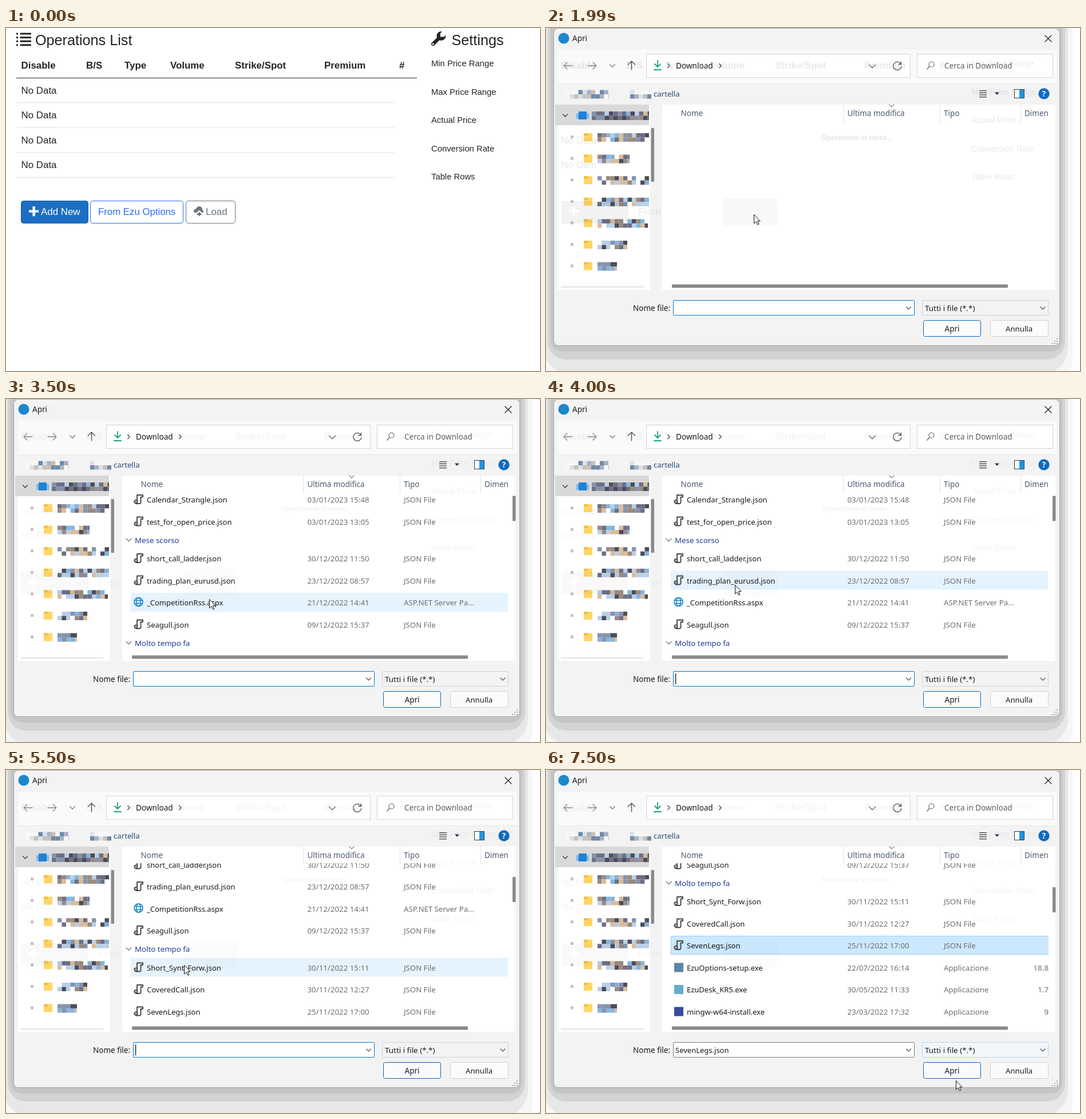
These frames come from a looping animation (933x600 px, 8 s). An HTML page:

```html
<!DOCTYPE html>
<html lang="it">
<head>
<meta charset="utf-8">
<style>
  html, body { margin: 0; width: 100%; height: 100%; overflow: hidden; background: #fff; }
  svg { display: block; width: 933px; height: 600px; }
  text { white-space: pre; }
  .page { font-family: "Liberation Sans", Arial, sans-serif; }
  .dlg { font-family: "Noto Sans", "Open Sans", sans-serif; }
</style>
</head>
<body>
<svg id="stage" viewBox="0 0 933 600"></svg>
<script>
const stage = document.getElementById('stage');

// Markup helpers
const rect = (x, y, w, h, fill, more = '') =>
  `<rect x="${x}" y="${y}" width="${w}" height="${h}" fill="${fill}" ${more}/>`;
const box = (x, y, w, h, fill, stroke, r = 0) =>
  rect(x + .5, y + .5, w - 1, h - 1, fill, `stroke="${stroke}" rx="${r}"`);
const text = (x, y, s, size, fill = '#1a1a1a', more = '') =>
  `<text x="${x}" y="${y}" font-size="${size}" fill="${fill}" ${more}>${s}</text>`;
const line = (d, stroke, w = 1.2) =>
  `<path d="${d}" fill="none" stroke="${stroke}" stroke-width="${w}" stroke-linecap="round" stroke-linejoin="round"/>`;
const disc = (x, y, r, fill) => `<circle cx="${x}" cy="${y}" r="${r}" fill="${fill}"/>`;
const shape = (d, x, y, k, fill) =>
  `<path d="${d}" fill="${fill}" transform="translate(${x} ${y}) scale(${k})"/>`;
const down = (x, y, r, c) => line(`M${x - r} ${y - r / 2}l${r} ${r}l${r} ${-r}`, c);
const right = (x, y, r, c) => line(`M${x - r / 2} ${y - r}l${r} ${r}l${-r} ${r}`, c);

function random(seed) {
  return () => (seed = seed * 16807 % 2147483647) / 2147483647;
}

// Web page
const INK = '#212529';
const WRENCH = 'M5.5 0c-1.38 0-2.5 1.12-2.5 2.5 0 .32.08.62.19.91l-2.91 2.88c-.39.39-.39 1.05 0 1.44.2.2.46.28.72.28.26 0 .52-.09.72-.28l2.88-2.91c.28.11.58.19.91.19 1.38 0 2.5-1.12 2.5-2.5 0-.16 0-.32-.03-.47l-.97.97h-2v-2l.97-.97c-.15-.03-.31-.03-.47-.03zm-4.5 6.5c.28 0 .5.22.5.5s-.22.5-.5.5-.5-.22-.5-.5.22-.5.5-.5z';
const CLOUD = 'M4.5 0c-1.21 0-2.27.86-2.5 2-1.1 0-2 .9-2 2 0 .37.11.71.28 1h2.22l2-2 2 2h1.41c.06-.16.09-.32.09-.5 0-.65-.42-1.29-1-1.5v-.5c0-1.38-1.12-2.5-2.5-2.5zm0 4.5l-2.5 2.5h2v.5c0 .28.22.5.5.5s.5-.22.5-.5v-.5h2l-2.5-2.5z';
const PLUS = 'M3 0v3h-3v2h3v3h2v-3h3v-2h-3v-3z';
const heads = [[26.5, 'Disable'], [140, 'B/S'], [207, 'Type'], [287, 'Volume'],
  [400, 'Strike/Spot'], [556, 'Premium'], [687, '#']]
  .map(([x, s]) => text(x, 71, s, 16.9, INK, 'font-weight="bold"')).join('');
const labels = ['Min Price Range', 'Max Price Range', 'Actual Price', 'Conversion Rate', 'Table Rows']
  .map((s, i) => text(743, 67 + i * 49.5, s, 14.8, INK)).join('');
const noData = i => text(26.5, 114.5 + i * 43.5, 'No Data', 16.9, INK);

function page(hover, focus) {
  let s = '';
  for (let i = 0; i < 4; i++) {
    const y = 8.5 + i * 6.6;
    s += rect(18, y, 3, 3, INK) + rect(24.5, y, 19.5, 3, INK);
    s += noData(i) + rect(18, 130.3 + i * 43.6, 661, 1, '#dee2e6');
  }
  s += text(51, 30, 'Operations List', 25.2, INK) + text(778.5, 30, 'Settings', 25.2, INK);
  s += shape(WRENCH, 743, 6, 3.15, INK) + heads + labels + rect(18, 87, 700, 1, INK);
  s += box(26, 302, 118, 40, '#1b6ec2', '#1861ac', 4) + shape(PLUS, 40, 312, 2.15, '#fff');
  s += text(61, 327, 'Add New', 16.9, '#fff');
  s += box(147, 302, 163, 40, '#fff', '#2a6df5', 4) + text(161, 327, 'From Ezu Options', 16.8, '#2a6df5');
  const tint = hover ? '#fff' : '#6c757d';
  if (focus) s += rect(310.5, 298.5, 94, 47, '#c1c5c8', 'rx="7"');
  s += box(314, 302, 87, 40, hover ? '#6c757d' : '#fff', '#6c757d', 4);
  s += shape(CLOUD, 328, 312, 2.15, tint) + text(349, 327, 'Load', 16.9, tint);
  return `<g class="page">${s}</g>`;
}

// File list: plain strings are group headings
const JS = 'JSON File', APP = 'Applicazione';
const files = [
  'All\'inizio della settimana',
  ['OperationsList.json', '10/01/2023 10:57', JS],
  'Settimana scorsa',
  ['Calendar_Strangle.json', '03/01/2023 15:48', JS],
  ['test_for_open_price.json', '03/01/2023 13:05', JS],
  'Mese scorso',
  ['short_call_ladder.json', '30/12/2022 11:50', JS],
  ['trading_plan_eurusd.json', '23/12/2022 08:57', JS],
  ['_CompetitionRss.aspx', '21/12/2022 14:41', 'ASP.NET Server Pa...'],
  ['Seagull.json', '09/12/2022 15:37', JS],
  'Molto tempo fa',
  ['Short_Synt_Forw.json', '30/11/2022 15:11', JS],
  ['CoveredCall.json', '30/11/2022 12:27', JS],
  ['SevenLegs.json', '25/11/2022 17:00', JS],
  ['EzuOptions-setup.exe', '22/07/2022 16:14', APP, '18.8', '#5b86a8'],
  ['EzuDesk_KR5.exe', '30/05/2022 11:33', APP, '1.7', '#62aecb'],
  ['mingw-w64-install.exe', '23/03/2022 17:32', APP, '9', '#3a4a9a']
];
const isGroup = f => typeof f === 'string';
const mids = [184];
for (let i = 1; i < files.length; i++)
  mids[i] = mids[i - 1] + (isGroup(files[i]) ? 32 : isGroup(files[i - 1]) ? 32.5 : 38.5);

function icon(f, y) {
  if (f[4]) return rect(224, y - 8, 16, 16, f[4]);
  if (f[0].endsWith('aspx'))
    return `<g fill="none" stroke="#1583c7" stroke-width="1.5"><circle cx="231.5" cy="${y - 1}" r="7.6"/>` +
      `<ellipse cx="231.5" cy="${y - 1}" rx="3.6" ry="7.6"/><path d="M224.500 ${y - 3.5}h14M224.500 ${y + 1.5}h14"/></g>`;
  return line(`M229 ${y + 2}v-10h10v3.500h-3.500v9q0 2.500-2.500 2.500h-6`, '#454545', 1.9) +
    `<circle cx="227" cy="${y + 3.5}" r="2.800" fill="#aaa" stroke="#454545" stroke-width="1.5"/>`;
}

function list({ x, y, scroll, chosen }) {
  let s = '';
  files.forEach((f, i) => {
    const m = mids[i] - scroll;
    if (m < 140 || m > 460) return;
    const group = isGroup(f), left = group ? 201 : 218;
    if (chosen && f[0] === 'SevenLegs.json') s += box(218, m - 17, 664, 33, '#cce8ff', '#99d1ff');
    else if (Math.abs(y - m) < 16.5) s += rect(left, m - 17, 877 - left, 33, '#e5f3ff');
    if (group) {
      s += down(214.5, m, 4.5, '#777') + text(225, m + 5, f, 13.3, '#1e3a93');
      return;
    }
    s += icon(f, m) + text(246, m + 5, f[0], 13);
    s += text(526.5, m + 5, f[1], 13.3, '#6d6d6d') + text(695, m + 5, f[2], 13.2, '#6d6d6d');
    if (f[3]) s += text(878, m + 5, f[3], 13.3, '#6d6d6d', 'text-anchor="end"');
  });
  return `<g clip-path="url(#rows)">${s}</g>`;
}

// Blurred-out names
const rnd = random(77);
const dark = ['#fff', '#4c4c58', '#8792ad', '#b9cfe8', '#d8bd9c', '#6d6f86', '#9a8a80', '#86b4de'];
const pale = ['#f7f7f7', '#d5e2ee', '#a8b2c4', '#6e8aa8', '#c9bfb5'];
function mosaic(x0, x1, y, colors) {
  let s = '';
  for (let x = x0; x < x1; x += 7.5)
    for (let j = 0; j < 2; j++)
      s += rect(x, y - 7 + j * 7.5, Math.min(7.5, x1 - x), 7.5, colors[rnd() * colors.length | 0]);
  return s;
}

function tree() {
  let s = rect(21, 134, 161, 324, '#fff') + rect(16, 134, 164, 36, '#d9d9d9');
  s += down(33.5, 153, 4, '#333') + rect(53, 149, 22, 10, '#7fb9ea') + rect(57, 146, 14, 14, '#1f82d6');
  s += mosaic(80, 180, 153, dark.slice(1));
  [180, 146, 180, 180, 178, 142, 124].forEach((end, i) => {
    const y = 191 + i * 37.6;
    s += rect(43, y - 3, 5, 5, '#c4c4c4') + rect(66, y - 7, 15, 14, '#ffd667') + rect(66, y - 7, 7, 4, '#f3bd45');
    s += mosaic(90, end, y, dark);
  });
  return s + rect(183.5, 175, 5.5, 94, '#8a8a8a', 'rx="1"') + rect(26, 452, 144, 2, '#e2e2e2');
}

function frame() {
  let s = rect(-20, -60, 940, 690, '#f6f6f6', 'rx="50"') + rect(-4, -60, 916, 665, '#e7e7e7', 'rx="45"') +
    rect(3, -60, 904, 640, '#d3d3d3', 'rx="32"') + rect(8, -60, 894, 626, '#c5c5c5', 'rx="20"');
  s += box(13, 0, 885, 556, '#f3f3f3', '#a5a5a5', 8);
  s += disc(31, 18, 9.5, '#1b87cc') + text(46, 23, 'Apri', 13.5);
  s += line('M872 13l11 11m0-11l-11 11', '#222', 1.3);
  s += rect(21, 38, 872, 59, '#fafafa') + rect(21, 97, 872, 1, '#e8e8e8');
  s += line('M46 66h-15m6-6l-6 6l6 6M73 66h15m-6-6l6 6l-6 6', '#8b8b8b', 1.3);
  s += down(116, 66, 4.5, '#777') + line('M149.500 73v-15m-6 6l6-6l6 6', '#555', 1.4);
  s += box(175, 45, 462, 42, '#fff', '#d4d4d4') + box(648, 45, 238, 42, '#fff', '#d4d4d4');
  s += line('M195 57v11m-5-5l5 5l5-5M189 73h12', '#16a37b', 1.8);
  s += right(214.5, 66, 3.5, '#444') + text(227, 70.5, 'Download', 13.6) + right(304.5, 66, 3.5, '#444');
  s += down(570, 67, 5.5, '#666') + line('M620 63a7 7 0 1 0 .800 4.500M620.500 59v4.500h-4.500', '#555', 1.3);
  s += `<circle cx="673.5" cy="63.500" r="4.500" fill="none" stroke="#666" stroke-width="1.2"/>` +
    line('M670 67l-4 5', '#666', 1.4) + text(696, 71, 'Cerca in Download', 13.5, '#5f5f5f');
  s += mosaic(34, 110, 115.5, pale) + mosaic(147, 184, 115.5, pale) + text(188, 120, 'cartella', 13.2, '#274a73');
  for (let i = 0; i < 4; i++) s += rect(757, 109 + i * 3.7, 13, 1.2, '#333');
  s += '<path d="M784 112.500h8l-4 4.500z" fill="#1d3f66"/>';
  s += box(818, 107, 18, 16, '#fff', '#2c3e50') + rect(827, 108, 8, 14, '#2196e3');
  s += disc(870, 115, 9.7, '#0f6cbd') + text(870, 120, '?', 13.5, '#fff', 'text-anchor="middle" font-weight="600"');
  s += tree() + rect(182, 134, 20, 324, '#fafafa', 'opacity="0"') + rect(203, 134, 687, 324, '#fff');
  s += rect(220, 448.500, 587, 6, '#8a8a8a', 'rx="1"');
  for (const x of [519, 688, 829]) s += rect(x, 134, 1, 31, '#e2e2e2');
  s += down(604, 136, 4, '#888');
  [[235.5, 'Nome'], [526.5, 'Ultima modifica'], [695, 'Tipo'], [836, 'Dimen']]
    .forEach(([x, t]) => s += text(x, 154, t, 13.5, '#4c5a70'));
  s += text(152, 495, 'Nome file:', 13.5);
  s += box(659, 511, 101, 29, '#fbfbfb', '#0067c0', 3) + text(709.5, 530.5, 'Apri', 13.5, '#1a1a1a', 'text-anchor="middle"');
  s += box(776, 511, 102, 29, '#fbfbfb', '#d0d0d0', 3) + text(803, 530.5, 'Annulla', 13.2);
  for (let i = 0; i < 3; i++)
    for (let j = 0; j <= i; j++) s += rect(892 - j * 4, 543 + i * 4, 2, 2, '#a8a8a8');
  return s;
}
const frameArt = frame();

// Faint trace of the page showing through
const ghost = alpha => `<g class="page" opacity="${alpha}">${heads}${labels}${noData(2)}${noData(3)}` +
  rect(27, 303, 117, 39, '#000', 'opacity=".5"') + shape(PLUS, 40, 312, 2.15, '#fff') +
  text(161, 327, 'From', 16.8, INK) + rect(310, 298, 95, 48, '#000', 'rx="6" opacity=".3"') + '</g>' +
  text(481, 196, 'Operazione in corso...', 11.5, '#000', `font-weight="bold" opacity="${alpha}"`);

function dialog(st) {
  let s = frameArt;
  if (!st.busy) s += list(st) + rect(885, 153 + st.scroll * .156, 5.5, 44, '#8a8a8a', 'rx="1"');
  s += box(222, 476, 422, 27, '#fff', st.chosen ? '#7a7a7a' : '#0078d4', 1) + down(633.5, 490, 4, '#555');
  if (st.chosen) s += text(226, 495, 'SevenLegs.json', 13);
  if (st.caret) s += rect(226, 480, 1.2, 19, '#000');
  s += box(657, 476, 221, 27, st.y > 500 ? '#f3f7fb' : '#f3f3f3', st.y > 500 ? '#bdd5e8' : '#d2d2d2', 1);
  s += text(662, 495, 'Tutti i file (*.*)', 13.4) + down(868, 490, 4, '#555');
  return `<g class="dlg">${s}${ghost(st.busy ? .1 : .045)}</g>`;
}

const ARROW = 'M.500.500v15.500l3.700-3.400l2.500 5.400l2.300-1l-2.500-5.300h4.700z';
const HAND = 'M4 12v-10q0-1.500 1.300-1.500t1.300 1.500v5q2.500-1 2.800.800q2.200-.800 2.600.800q2.600-.600 2.600 1.800v4q0 2.500-1.600 4.200v1.900h-7.500v-1.700l-4.800-6.200q-1-1.700.300-2.200t3 1.600z';
const cursor = (d, x, y) =>
  `<path d="${d}" transform="translate(${x} ${y})" fill="#fff" stroke="#111" stroke-width="1"/>`;

const clip = '<defs><clipPath id="rows"><rect x="201" y="163" width="677" height="276"/></clipPath></defs>';

const states = [
  { t: 0 },
  { t: 500, x: 539, y: 402 },
  { t: 990, x: 358, y: 326, hover: true },
  { t: 1490, x: 358, y: 326, hover: true, focus: true },
  { t: 1990, x: 363, y: 326, scroll: 0, busy: true },
  { t: 2500, x: 363, y: 326, scroll: 0 },
  { t: 3000, x: 355, y: 350, scroll: 0, caret: true },
  { t: 3500, x: 355, y: 350, scroll: 105 },
  { t: 4000, x: 330, y: 325, scroll: 105, caret: true },
  { t: 4500, x: 304, y: 337, scroll: 218.5, caret: true },
  { t: 5000, x: 308, y: 340, scroll: 334 },
  { t: 5500, x: 311, y: 341, scroll: 218.5, caret: true },
  { t: 6000, x: 311, y: 341, scroll: 334 },
  { t: 6500, x: 300, y: 312, scroll: 334, caret: true },
  { t: 7000, x: 300, y: 312, scroll: 334, chosen: true },
  { t: 7500, x: 716, y: 543, scroll: 334, chosen: true }
];

function draw(st) {
  let s = clip + ('scroll' in st ? dialog(st) : page(st.hover, st.focus));
  if (st.focus) s += disc(363, 326, 14, 'rgba(216,216,0,.65)');
  if (st.x) s += cursor(st.hover ? HAND : ARROW, st.x, st.y);
  stage.innerHTML = s;
}

let shown;
const start = performance.now();
function tick() {
  const t = (performance.now() - start) % 8000;
  const st = states.findLast(v => v.t <= t);
  if (st !== shown) draw(shown = st);
  requestAnimationFrame(tick);
}
tick();
</script>
</body>
</html>
```
